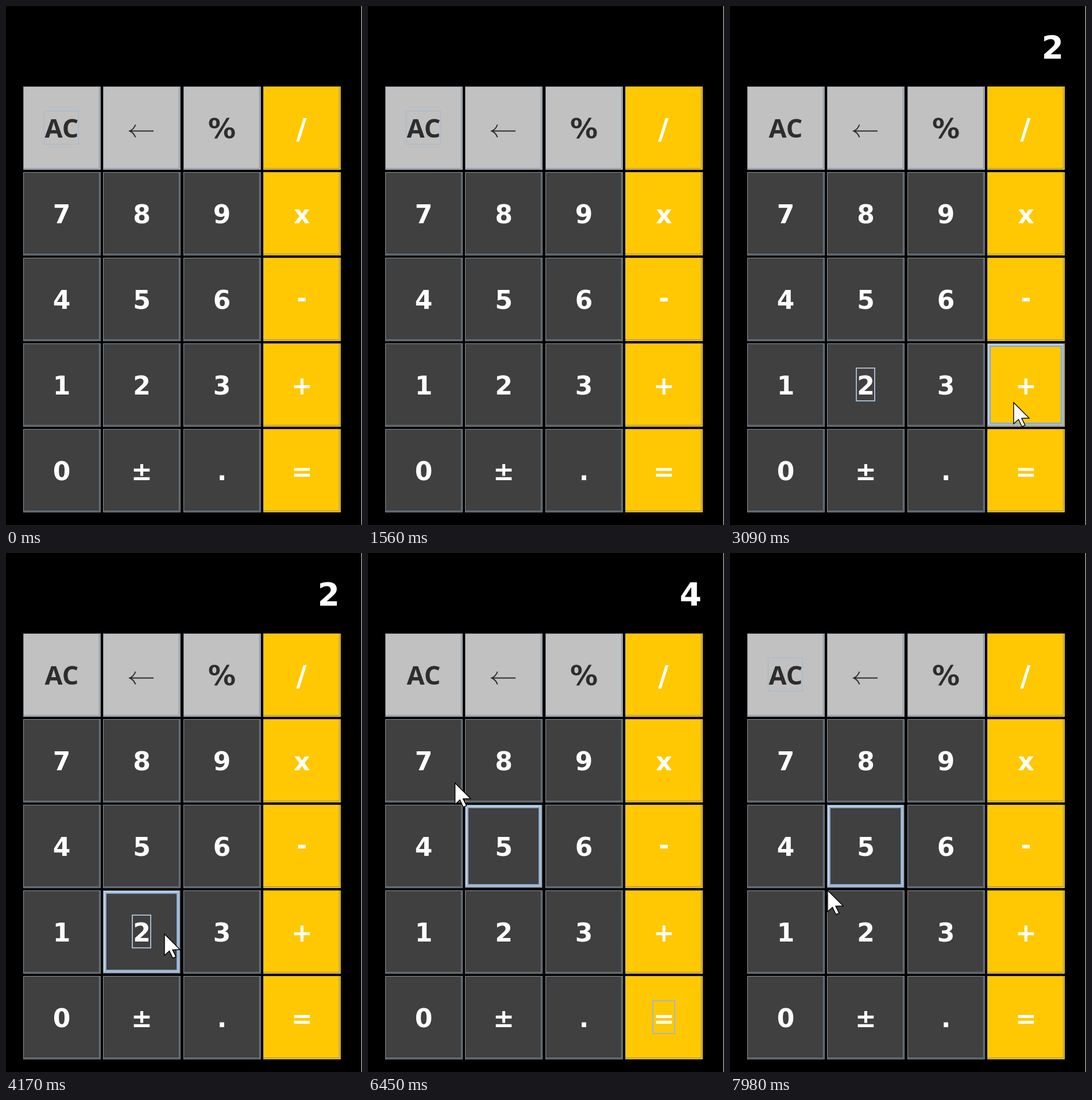
Write an HTML page with a canvas that moves like this. It is 620 px wide and 903 px high and loops after 8 s.

```html
<!DOCTYPE html>
<html lang="en">
<head>
<meta charset="utf-8">
<title>Calculator</title>
<style>
  html, body { margin: 0; width: 100%; height: 100%; overflow: hidden; background: #000; }
  canvas { display: block; width: 620px; height: 903px; }
</style>
</head>
<body>
<canvas id="stage" width="620" height="903"></canvas>
<script>
const ctx = document.getElementById('stage').getContext('2d');
const LOOP = 8000;
const KEYS = 'AC ← % / 7 8 9 x 4 5 6 - 1 2 3 + 0 ± . ='.split(' ');
const W = 135, H = 145;
const FONT = '"DejaVu Sans", sans-serif';
const FONT_AC = '"Noto Sans", "Open Sans", sans-serif';
const HOVER_LAG = 90;
const SHADOW = '#7a8a99';

// The pointer eases from stop to stop; a key is clicked just before leaving it.
const STOPS = [
  { arrive: 1580, leave: 1580, x: 262, y: 903 },
  { arrive: 2130, leave: 2560, x: 245, y: 665, key: '2', readout: '2' },
  { arrive: 3090, leave: 3480, x: 494, y: 690, key: '+', readout: '' },
  { arrive: 3950, leave: 4170, x: 276, y: 663, key: '2', readout: '2' },
  { arrive: 5220, leave: 5740, x: 490, y: 789, key: '=', readout: '4' },
  { arrive: 6793, leave: 7410, x: 40, y: 272, key: 'AC', readout: '' },
  { arrive: 7800, leave: 7800, x: 180, y: 480 },
  { arrive: 7980, leave: LOOP, x: 170, y: 587 }
];

const keyX = i => 30 + (i % 4) * 139.5;
const keyY = i => 140 + Math.floor(i / 4) * 149;
const smooth = u => u * u * (3 - 2 * u);

function pointer(t) {
  if (t < STOPS[0].arrive) return null;
  const next = STOPS.findIndex(s => t < s.arrive);
  if (next < 0) return STOPS[STOPS.length - 1];
  const a = STOPS[next - 1], b = STOPS[next];
  const u = smooth(Math.max(0, (t - a.leave) / (b.arrive - a.leave)));
  return { x: a.x + (b.x - a.x) * u, y: a.y + (b.y - a.y) * u };
}

function hoveredKey(t) {
  const p = pointer(t - HOVER_LAG);
  if (!p) return -1;
  return KEYS.findIndex((k, i) => p.x >= keyX(i) && p.x < keyX(i) + W &&
                                  p.y >= keyY(i) && p.y < keyY(i) + H);
}

function stateAt(t) {
  const state = { focus: 'AC', pressed: '', readout: '' };
  for (const { leave, key, readout } of STOPS) {
    const down = leave - 140, up = leave - 50;
    if (!key || t < down) continue;
    state.focus = key;
    state.pressed = t < up ? key : '';
    if (t >= up) state.readout = readout;
  }
  return state;
}

function frame(x, y, w, h, color, width = 1) {
  ctx.strokeStyle = color;
  ctx.lineWidth = width;
  ctx.strokeRect(x + width / 2, y + width / 2, w - width, h - width);
}

// Right and bottom edges only
function corner(x, y, w, h, color) {
  ctx.fillStyle = color;
  ctx.fillRect(x + w - 1, y, 1, h);
  ctx.fillRect(x, y + h - 1, w, 1);
}

function label(text, x, y, size, color, family = FONT, align = 'center') {
  ctx.font = `bold ${size}px ${family}`;
  ctx.textAlign = align;
  ctx.fillStyle = color;
  ctx.fillText(text, x, y);
}

function backArrow(cx, cy) {
  ctx.strokeStyle = '#2d2d2d';
  ctx.lineWidth = 2;
  ctx.beginPath();
  ctx.moveTo(cx + 20.5, cy);
  ctx.lineTo(cx - 20, cy);
  ctx.moveTo(cx - 11, cy - 11);
  ctx.quadraticCurveTo(cx - 14, cy - 3, cx - 21, cy);
  ctx.quadraticCurveTo(cx - 14, cy + 3, cx - 11, cy + 11);
  ctx.stroke();
}

function drawLabel(key, cx, base, ink) {
  if (key === '←') backArrow(cx, base - 11.5);
  else if (key === 'AC') label(key, cx, base, 45, ink, FONT_AC);
  else if (key === '%') label(key, cx, base + 1, 48, ink);
  else if (key === '/') label(key, cx - 1, base + 2, 50, ink);
  else if (key === '-') label(key, cx, base - 3, 44, ink);
  else label(key, cx, base, 44, ink);
}

function drawKey(i, state, hovered) {
  const key = KEYS[i], x = Math.floor(keyX(i)), y = keyY(i);
  const gold = i % 4 === 3, light = i < 3;
  const fill = gold ? '#ffc803' : light ? '#c1c1c1' : '#404040';
  ctx.fillStyle = state.pressed === key ? '#b8cfe5' : fill;
  ctx.fillRect(x, y, W, H);

  if (hovered) {
    frame(x, y, W - 1, H - 1, SHADOW);
    frame(x + 1, y + 1, W - 3, H - 3, '#b8cfe5', 3);
    frame(x + 4, y + 4, W - 9, H - 9, '#8ba6c6', 2);
    corner(x + 2, y + 2, W - 5, H - 5, '#8ba6c6');
  } else {
    frame(x, y, W, H, gold ? '#e0b628' : '#87929c');
    corner(x, y, W - 2, H - 2, gold ? '#8d8d72' : SHADOW);
  }

  const cx = keyX(i) + 67;
  drawLabel(key, cx, y + 89, light ? '#2d2d2d' : '#fff');

  if (state.focus === key) {
    ctx.font = `bold 44px ${key === 'AC' ? FONT_AC : FONT}`;
    const w = Math.round(ctx.measureText(key).width) + 3;
    frame(Math.floor(cx - w / 2), y + 42, w, 59, '#a3b8cc', light ? 1 : 2);
  }
}

function drawPointer({ x, y }) {
  const shape = [[0, 0], [0, 37], [8.5, 29.5], [14.5, 42], [20, 39.5], [14, 27.5], [27, 27]];
  ctx.beginPath();
  for (const [dx, dy] of shape) ctx.lineTo(x + dx, y + dy);
  ctx.closePath();
  ctx.fillStyle = '#fff';
  ctx.fill();
  ctx.strokeStyle = '#000';
  ctx.lineWidth = 1.4;
  ctx.stroke();
}

function draw(now) {
  const t = now % LOOP;
  const state = stateAt(t), over = hoveredKey(t), p = pointer(t);
  ctx.fillStyle = '#000';
  ctx.fillRect(0, 0, 620, 903);
  ctx.fillStyle = '#e8e8e8';
  ctx.fillRect(619, 0, 1, 903);
  KEYS.forEach((key, i) => drawKey(i, state, i === over));
  label(state.readout, 581, 91, 55, '#fff', FONT, 'right');
  if (p) drawPointer(p);
}

const start = performance.now();
function tick() {
  draw(performance.now() - start);
  requestAnimationFrame(tick);
}
tick();
</script>
</body>
</html>
```
